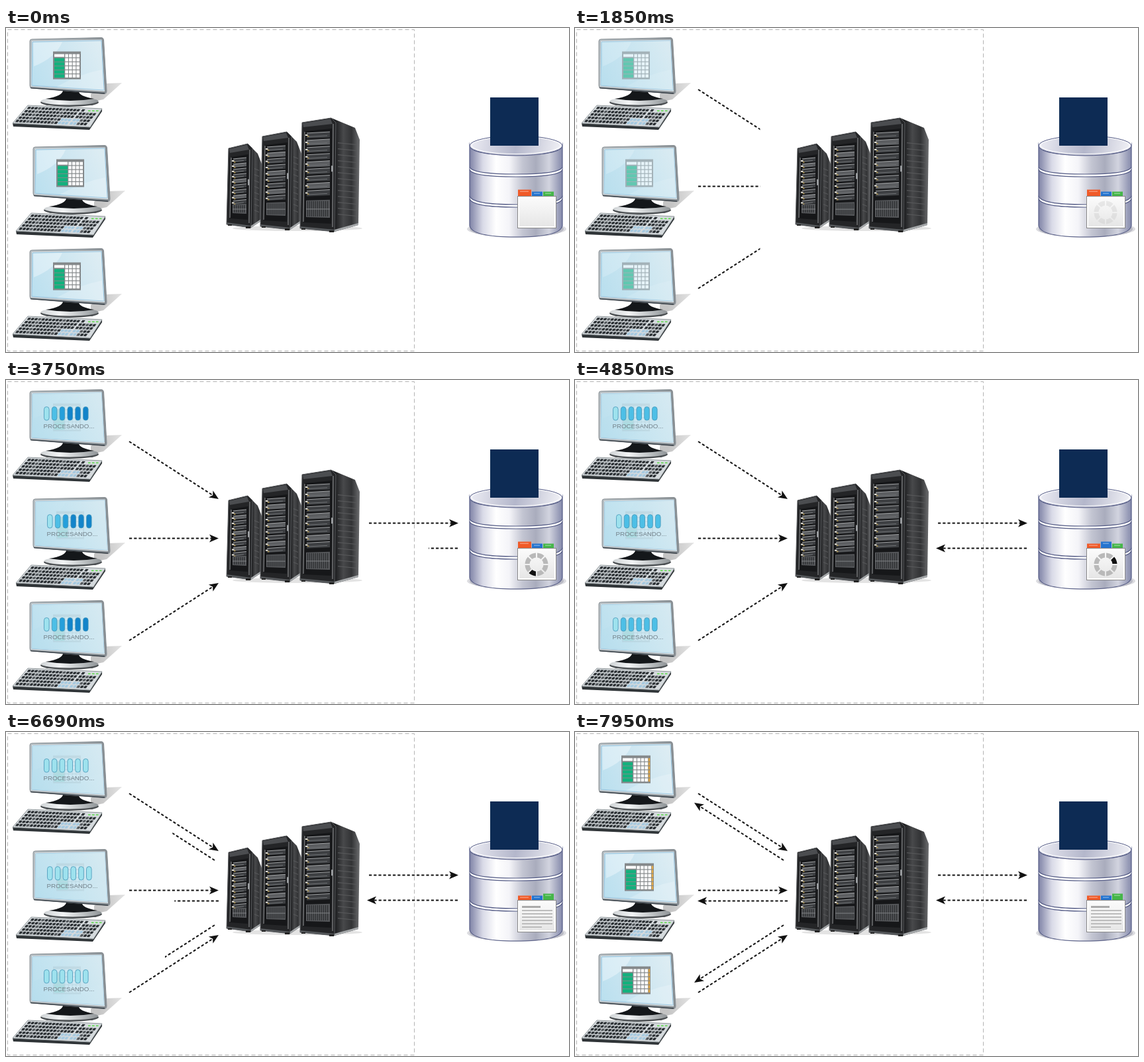
These frames come from a looping animation (850 by 490 pixels, 8 s). An HTML page with a canvas:

```html
<!DOCTYPE html>
<html lang="es">
<head>
<meta charset="utf-8">
<style>
html, body { margin: 0; width: 100%; height: 100%; overflow: hidden; background: #fff }
canvas { display: block }
</style>
</head>
<body>
<canvas id="stage" width="850" height="490"></canvas>
<script>
const stage = document.getElementById('stage').getContext('2d');
const still = document.createElement('canvas');
still.width = 850;
still.height = 490;
let c = still.getContext('2d');

const PCS = [[0, 0], [5, 163], [0, 319]];
const clamp = v => Math.max(0, Math.min(1, v));

function poly(fill, pts, stroke, width = 1) {
  c.beginPath();
  for (let i = 0; i < pts.length; i += 2) c.lineTo(pts[i], pts[i + 1]);
  c.closePath();
  paint(fill, stroke, width);
}
function shape(fill, d, stroke, width = 1) {
  const p = new Path2D(d);
  if (fill) { c.fillStyle = fill; c.fill(p); }
  if (stroke) { c.strokeStyle = stroke; c.lineWidth = width; c.stroke(p); }
}
function paint(fill, stroke, width = 1) {
  if (fill) { c.fillStyle = fill; c.fill(); }
  if (stroke) { c.strokeStyle = stroke; c.lineWidth = width; c.stroke(); }
}
function rect(fill, x, y, w, h) {
  c.fillStyle = fill;
  c.fillRect(x, y, w, h);
}
function oval(fill, x, y, rx, ry, stroke) {
  c.beginPath();
  c.ellipse(x, y, rx, ry, 0, 0, 7);
  paint(fill, stroke);
}
function blend(x0, y0, x1, y1, ...colors) {
  const g = c.createLinearGradient(x0, y0, x1, y1);
  colors.forEach((k, i) => g.addColorStop(i / (colors.length - 1), k));
  return g;
}
function at(x, y, draw) {
  c.save();
  c.translate(x, y);
  draw();
  c.restore();
}

const SCREEN = [40, 21, 144, 19, 148, 94, 39, 87];

function computer() {
  poly(blend(140, 0, 176, 0, '#c4c4c4', '#e4e4e4'), [148, 84, 175, 83, 147, 108, 128, 112, 128, 100]);
  // stand
  oval('#4c5053', 96, 112.5, 44, 6.5);
  oval(blend(52, 0, 140, 0, '#cfd3d5', '#f2f4f5', '#c2c6c8', '#8d9295'), 96, 110.5, 43.5, 6);
  shape('#14171a', 'M86 94L110 96Q110 103 133 107Q98 113 60 107Q86 103 86 94Z');
  // monitor
  shape(blend(36, 0, 152, 0, '#b4bdc2', '#a3abb0', '#858c91'),
    'M39 17L144 14.5Q147 14.5 147.5 18L152 95Q152 100 148 99.5L39 91Q36 91 36 87L36 20Q36 17 39 17Z', '#8b9195');
  poly('#dde4e7', [39, 19.5, 144.5, 17.5, 149, 96, 38, 88]);
  poly(blend(40, 80, 147, 30, '#bbe0ef', '#cde6f1', '#deedf3'), SCREEN, '#93c3e0');
  shape('rgba(255,255,255,.35)', 'M41 22L85 21Q75 45 42 58Z');
  shape('rgba(255,255,255,.2)', 'M76 89Q112 69 145 63L148 94Z');
  shape(null, 'M37 90.5L149 99', '#3a4148', 1.3);
  // keyboard
  poly('#2f3437', [10, 144, 127, 149, 145, 122, 145, 126, 126, 154, 11, 149]);
  poly('#d5dadd', [33, 117, 145, 122, 127, 150, 10, 144], '#8f9699');
  for (let row = 0; row < 5; row++) for (let k = 0; k < 20; k++) {
    if (row === 0 && k > 15) continue;
    const x = 34 + k * 5.3 - row * 4.4 + (k > 14 ? 2 : 0);
    const y = 119 + row * 4.9 + k * .25;
    const blue = row > 2 && k > 11 && k < 17;
    poly(blue ? '#a5c9e0' : k % 7 === 3 ? '#54595d' : '#2b3034',
      [x, y, x + 4.2, y + .2, x + 1.6, y + 3.8, x - 2.5, y + 3.6]);
  }
  for (const x of [124, 130, 136]) rect('#5fdc4c', x, 124.5, 3.5, 1.6);
}

function rack(x, y, w, h, side) {
  at(x, y, () => {
    const right = w + side;
    poly(blend(w, 0, right, 0, '#1d1e20', '#48494b', '#323335', '#6c6d6f'),
      [w - 6, -5, right - 7, 10, right, 28, right - 2, h - 7, w - 1, h + 3]);
    for (let v = 32; v < h - 20; v += 9)
      poly('#58595b', [w + 4, v, right - 5, v + 3, right - 5, v + 4, w + 4, v + 1.2]);
    poly('#242527', [3, 2, w - 6, -5, w + 1, 2, w - 1, h + 3, 0, h - 2], '#5b5d60');
    poly('#4b4d50', [4, 3, w - 7, -3.5, w - 4, 4, 5, 9]);
    poly('#161719', [7, 15, w - 5, 11, w - 6, h - 9, 5, h - 11]);
    shape(null, `M7 16L5 ${h - 12}M${w - 3} 4L${w - 4} ${h - 4}`, '#a4a6a9', .9);
    const pitch = h / 15;
    for (let i = 0; i < 9; i++) {
      const v = 18 + i * pitch, b = w - 8;
      poly(i % 3 === 1 ? '#5c5e61' : '#3d3f42', [10, v, b, v - 2, b, v + pitch - 4.5, 10, v + pitch - 3]);
      shape(null, `M10 ${v}L${b} ${v - 2}`, '#a2a4a6', 1);
      shape(null, `M13 ${v + pitch * .5}L${b - 4} ${v + pitch * .5 - 1.6}`, '#707376', 1);
      rect('#ece8dc', 8, v + 2, 3.5, 2);
      rect('#b39a55', 11, v + 4, 2.5, 1.6);
    }
    const top = h * .73;
    poly('#56585b', [9, top, w - 8, top - 1, w - 8, h - 18, 9, h - 19]);
    for (let u = 11; u < w - 9; u += 3) rect('#2a2c2e', u, top + 1, 1.3, h - 21 - top);
    rect('#808386', 9, top + (h - 19 - top) / 2, w - 17, 1);
    rect('#9a9da0', w - 6, h * .41, 2.5, 9);
    poly('#55585b', [0, h - 5, w - 1, h, w - 1, h + 3, 0, h - 2]);
    poly('#a5a8aa', [w - 1, h, right - 2, h - 10, right - 2, h - 7, w - 1, h + 3]);
    rect('#222', 2, h - 2, 6, 2);
    rect('#222', w - 9, h + 1, 7, 3);
  });
}

function band(top, bottom, sag, end) {
  const d = `M700 ${top}Q703 ${top + sag} 770 ${top + sag}Q837 ${top + sag} 840 ${top}` +
    `L840 ${bottom}Q837 ${bottom + end} 770 ${bottom + end}Q703 ${bottom + end} 700 ${bottom}Z`;
  shape(blend(700, 0, 840, 0, '#7f83a6', '#d9dae7', '#ffffff', '#f4f4f8', '#c3c5d2', '#a9acbd', '#d2d4df', '#858aab'),
    d, '#555c86', 1.2);
}

function database() {
  oval('#dcdce0', 771, 304, 75, 12);
  oval('#b9bac4', 771, 304, 71, 13);
  band(258, 299, 13, 17);
  band(214, 254, 11, 13);
  band(178, 210, 14, 11);
  oval(blend(700, 165, 840, 192, '#eeeef5', '#b4b7cb', '#f4f4f8'), 770, 178, 70, 15, '#555c86');
  oval(null, 770, 177.5, 67, 13, '#ffffff');
  rect('#0d2b54', 731, 105, 73, 73);
}

c.fillStyle = '#fff';
c.fillRect(0, 0, 850, 490);
c.setLineDash([6, 4]);
c.strokeStyle = '#b3b3b3';
c.strokeRect(2.5, 2.5, 614, 486);
c.setLineDash([]);
PCS.forEach(([x, y]) => at(x, y, computer));
oval('#e3e3e3', 440, 303, 98, 4);
rack(333, 180, 38, 119, 16);
rack(384, 162, 46, 140, 16);
rack(444, 141, 53, 164, 37);
database();

c = stage;

function table(gold) {
  const x = gold ? 70 : 71, y = 35.5;
  rect('#84888a', x, y, gold ? 44 : 42, 42);
  rect('#fff', x + 2, y + 4, 15, 4.2);
  for (let row = 0; row < 6; row++) {
    const v = y + 4 + row * 6.1;
    if (row) rect('#14b07d', x + 2, v, 15, 5.2);
    for (let k = 0; k < 4; k++) rect('#fff', x + 18.3 + k * 5.7, v, 4.6, 4.9);
    if (gold) rect('#e2ab4c', x + 40.7, v, 2.5, 5);
  }
}

const WAVE = [0, 1, 2, 3, 4, 4, 3, 2, 1, 0];
const BLUES = ['#9ee2ee', '#4dbfe6', '#259fdb', '#1284ca', '#0969b4'];

function level(t) {
  const k = t < 6410 ? Math.min(14, Math.floor((t - 2430) / 220)) : 5 + Math.floor((t - 6410) / 70);
  return WAVE[Math.max(0, k) % 10];
}

function screen(t, veil, busy) {
  table(t >= 7250);
  c.globalAlpha = veil;
  poly(blend(40, 80, 147, 30, '#b7deed', '#c5e4f0', '#d5e9f1'), SCREEN);
  c.globalAlpha = busy;
  for (let i = 0; i < 6; i++) {
    c.beginPath();
    c.roundRect(57.5 + i * 11.8, 40.5, 7.6, 20.5, 3.8);
    paint(BLUES[Math.min(i, level(t))], '#4796b8', .8);
  }
  c.fillStyle = '#74838c';
  c.font = '9.7px "Liberation Sans", Arial, sans-serif';
  c.fillText('PROCESANDO...', 56.5, 73);
  c.globalAlpha = 1;
}

// dashed arrow, revealed along x up to the share p
function arrow(x0, y0, x1, y1, p) {
  if (p <= 0) return;
  const len = Math.hypot(x1 - x0, y1 - y0), dir = Math.sign(x1 - x0);
  c.save();
  if (p < 1) {
    const edge = x0 + (x1 - x0) * p;
    c.beginPath();
    c.rect(Math.min(edge, edge - dir * 200), 0, 200, 490);
    c.clip();
  }
  c.translate(x0, y0);
  c.rotate(Math.atan2(y1 - y0, x1 - x0));
  c.setLineDash([4.2, 3]);
  c.beginPath();
  c.moveTo(0, 0);
  c.lineTo(len - 10, 0);
  paint(null, '#111', 2);
  c.setLineDash([]);
  poly('#111', [len, 0, len - 14, -6, len - 10.5, 0, len - 14, 6]);
  c.restore();
}

function spinner(t) {
  c.globalAlpha = t < 2210 ? clamp((t - 1500) / 70 * .05) : 1;
  const dark = t < 2210 ? -1 : t < 2430 ? 2 : (Math.floor((t - 2430) / 220) + 6) % 8;
  for (let k = 0; k < 8; k++) {
    const a = (k - 2) * Math.PI / 4;
    c.beginPath();
    c.arc(801, 279, 17.5, a + .06, a + .725);
    c.arc(801, 279, 10.5, a + .69, a + .1, true);
    c.closePath();
    paint(k === dark ? '#111' : '#b9b9b9');
  }
  c.globalAlpha = 1;
}

function panel(t) {
  const active = t < 3970 ? 0 : t < 5510 ? 1 : 2;
  [['#f05a28', 773, 20], ['#2474cf', 794, 16], ['#45b649', 811, 16]].forEach(([color, x, w], i) => {
    const y = i === active ? 244.5 : 247.5;
    rect(color, x, y, w, 255 - y);
    rect('rgba(255,255,255,.35)', x + 3, y + 2, w - 7, 1.5);
  });
  rect('#888', 772, 254, 59, 49);
  rect('#fff', 773, 255, 57, 47);
  rect(blend(0, 258, 0, 300, '#fafafa', '#e6e6e6'), 775, 258, 53, 42);
  if (t >= 5510) {
    rect('#aaa', 779, 263, 28, 3);
    for (let i = 0; i < 6; i++) rect('#bcbcbc', 779, 269 + i * 5, i === 5 ? 30 : 46, 2);
  } else if (t >= 1500) spinner(t);
}

function replyShare(t) {
  const x = t < 3750 ? 653 : 638 - Math.floor((t - 3750) / 220) * 23.25;
  return clamp((682 - x) / 137);
}

function frame(now) {
  const t = now % 8000;
  const out = t < 1500 ? 0 : Math.min(8, Math.floor((t - 1500) / 70) + 1);
  const back = t < 6410 ? 0 : Math.floor((t - 6410) / 70) + 1;
  const fade = t < 7250 ? 0 : clamp(Math.floor((t - 7250) / 70) / 10);
  const veil = (t < 2430 ? out * .075 : t < 2650 ? .75 : .88) * (1 - fade);
  const busy = (t < 2430 ? 0 : t < 2650 ? .5 : 1) * (1 - fade);

  c.drawImage(still, 0, 0);
  PCS.forEach(([x, y]) => at(x, y, () => screen(t, veil, busy)));
  panel(t);

  const go = clamp((out - 1.5) / 6.5);
  arrow(186, 93, 321, 180, go);
  arrow(186, 239.5, 321, 239.5, go);
  arrow(186, 394, 321, 307, go);
  if (t >= 1990) arrow(548, 216.5, 683, 216.5, clamp((15 + Math.floor((t - 1990) / 220) * 22) / 135));
  if (t >= 3530) arrow(682, 254.5, 545, 254.5, replyShare(t));
  arrow(315, 194, 180, 107, clamp(back / 10.6));
  arrow(321, 255.5, 185, 255.5, clamp(back / 10.2));
  arrow(315, 292, 180, 379, clamp(back / 9));
  requestAnimationFrame(() => frame(performance.now()));
}
frame(performance.now());
</script>
</body>
</html>
```
